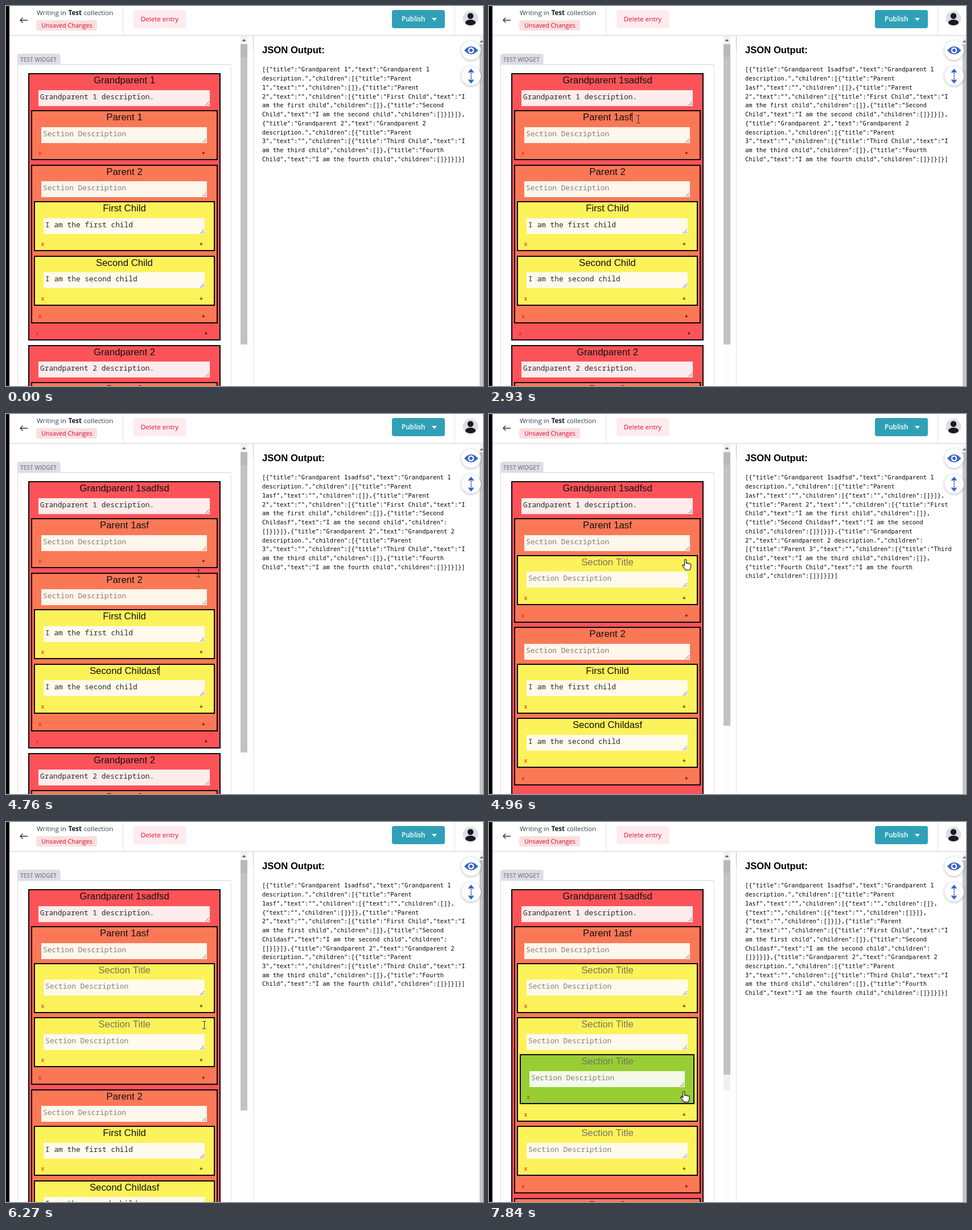
Recreate the animation shown at these times as an HTML page with a canvas. Size 838 px wide and 668 px high, loop 8 s.

```html
<!DOCTYPE html>
<html lang="en">
<head>
<meta charset="utf-8">
<title>Nested section editor</title>
<style>
html, body { margin: 0; width: 100%; height: 100%; overflow: hidden; background: #fff; }
canvas { display: block; }
</style>
</head>
<body>
<canvas id="stage" width="838" height="668"></canvas>
<script>
const ctx = document.getElementById('stage').getContext('2d');
const LOOP = 8000;
const UI = '"Open Sans", sans-serif';
const ARIAL = '"Liberation Sans", Arial, sans-serif';
const TITLE_FONT = '16.8px ' + ARIAL;
const AREA_FONT = '12.83px "Noto Sans Mono", monospace';
const JSON_FONT = '10.4px "DejaVu Sans Mono", monospace';

// Box and text area fill for each nesting depth
const FILLS = ['#fc5359', '#fb7857', '#fcf259', '#97ce33'];
const AREAS = ['#feecec', '#fff6ec', '#fffaeb', '#f4faea'];
const HEAD = 64.8, FOOT = 23.2, GAP = 7.5, MID = 208;

// Section titles being typed: [time, suffix]
const TYPED = {
  top: [[1290, 's'], [1460, 'sad'], [1640, 'sadfs'], [1810, 'sadfsd']],
  parent: [[2600, 'a'], [2730, 'as'], [2860, 'asf']],
  child: [[3780, 'a'], [3900, 'as'], [4230, 'asf']]
};
const FOCUS = [[900, 'top'], [2470, 'parent'], [3650, 'child'], [4800, null]];
const ADDED = [4900, 6000, 6930, 7450];
const CLICKS = [[4780, 4900], [5870, 6000], [6800, 6930], [7250, 7450]];
const THUMB_ENDS = [595, 548, 507, 472, 444];

// Pointer path: [time, x, y, kind]
const PATH = [
  [240, 330, 420, 'arrow'], [900, 307, 134, 'beam'], [2080, 307, 134, 'beam'],
  [2470, 262, 198, 'beam'], [2860, 262, 198, 'beam'], [3120, 285, 258, 'arrow'],
  [3390, 285, 258, 'arrow'], [3650, 286, 452, 'beam'], [4440, 286, 452, 'beam'],
  [4780, 345, 256, 'hand'], [4900, 345, 255, 'beam'], [5100, 345, 255, 'beam'],
  [5400, 347, 353, 'hand'], [5870, 347, 353, 'hand'], [6000, 348, 357, 'beam'],
  [6330, 348, 357, 'beam'], [6550, 347, 447, 'hand'], [6930, 347, 449, 'beam'],
  [7190, 344, 417, 'hand'], [7450, 344, 417, 'hand'], [7780, 342, 481, 'hand']
];

function last(list, t) {
  let found = null;
  for (const item of list) if (item[0] <= t) found = item;
  return found;
}

function rect(x, y, w, h, color, r = 0) {
  ctx.fillStyle = color;
  ctx.beginPath();
  ctx.roundRect(x, y, w, h, r);
  ctx.fill();
}

function disc(x, y, r, color) {
  ctx.fillStyle = color;
  ctx.beginPath();
  ctx.arc(x, y, r, 0, Math.PI * 2);
  ctx.fill();
}

function text(str, x, y, font, color, align = 'left') {
  ctx.font = font;
  ctx.fillStyle = color;
  ctx.textAlign = align;
  ctx.fillText(str, x, y);
}

function poly(points, color) {
  ctx.fillStyle = color;
  ctx.beginPath();
  points.forEach(([x, y]) => ctx.lineTo(x, y));
  ctx.closePath();
  ctx.fill();
}

function stroke(path, color, width = 1) {
  ctx.strokeStyle = color;
  ctx.lineWidth = width;
  ctx.stroke(new Path2D(path));
}

function buildTree(t) {
  const typed = key => (last(TYPED[key], t) || [0, ''])[1];
  const node = (title, body, ...children) => ({ title, text: body, children });
  const blank = () => ({ text: '', children: [] });
  const count = ADDED.filter(a => a <= t).length;
  const extra = Array.from({ length: Math.min(count, 3) }, blank);
  if (count > 3) extra[1].children.push(blank());
  return [
    node('Grandparent 1' + typed('top'), 'Grandparent 1 description.',
      node('Parent 1' + typed('parent'), '', ...extra),
      node('Parent 2', '',
        node('First Child', 'I am the first child'),
        node('Second Child' + typed('child'), 'I am the second child'))),
    node('Grandparent 2', 'Grandparent 2 description.',
      node('Parent 3', '',
        node('Third Child', 'I am the third child'),
        node('Fourth Child', 'I am the fourth child')))
  ];
}

function heightOf(node) {
  return node.children.reduce((sum, c) => sum + heightOf(c) + GAP, HEAD + FOOT);
}

function drawArea(node, depth, y) {
  const left = Math.round(57 + 4.5 * depth);
  const right = Math.round(357.9 - 4.5 * depth);
  const top = Math.round(y + 29.6);
  rect(left, top, right - left, 28, AREAS[depth]);
  text(node.text || 'Section Description', left + 3, top + 16, AREA_FONT,
    node.text ? '#2b2b2b' : '#857f78');
  stroke(`M${right - 8} ${top + 27}l7 -7M${right - 4} ${top + 27}l3 -3`, '#666');
}

function drawNode(node, depth, y) {
  const height = heightOf(node);
  const left = 39 + 5 * depth, right = Math.round(377 - 5.2 * depth);
  const top = Math.round(y), bottom = Math.round(y + height);
  rect(left, top, right - left, bottom - top, '#0c0808');
  rect(left + 2, top + 2, right - left - 4, bottom - top - 4, FILLS[depth]);
  text(node.title || 'Section Title', MID, top + 18, TITLE_FONT,
    node.title ? '#111' : '#78755f', 'center');
  drawArea(node, depth, y);
  let childY = y + HEAD;
  for (const child of node.children) {
    drawNode(child, depth + 1, childY);
    childY += heightOf(child) + GAP;
  }
  const font = '10.67px ' + ARIAL;
  text('x', 55 + 4.7 * depth, bottom - 9, font, depth ? '#e8121c' : '#d8222e', 'center');
  text('+', 351 - 4.1 * depth, bottom - 9, font, '#000', 'center');
}

function drawCaret(tree, t) {
  const focus = last(FOCUS, t);
  if (!focus || !focus[1]) return;
  const parents = tree[0].children;
  const spot = {
    top: [tree[0].title, 122],
    parent: [parents[0].title, 187],
    child: [parents[1].children[1].title, 442]
  }[focus[1]];
  ctx.font = TITLE_FONT;
  rect(Math.round(MID + ctx.measureText(spot[0]).width / 2), spot[1], 1, 17, '#111');
}

function drawJson(tree) {
  const parts = JSON.stringify(tree).split(/(?<= )|(?<=[,:])(?=[\[{])/);
  const lines = [''];
  for (const part of parts) {
    const line = lines[lines.length - 1];
    if ((line + part).trimEnd().length > 59) lines.push(part);
    else lines[lines.length - 1] += part;
  }
  lines.forEach((line, i) => text(line, 450, Math.round(115.4 + 15.73 * i), JSON_FONT, '#080808'));
}

function drawHeader() {
  rect(6, 51, 832, 1, '#dcdde0');
  rect(6, 52, 832, 1, '#eeeff1');
  rect(205, 0, 1, 52, '#dfe0e4');
  rect(788, 0, 1, 52, '#dfe0e4');
  stroke('M25 25H38M29.5 20.5L25 25L29.5 29.5', '#2b2f38', 1.3);

  const ink = '#313a48';
  text('Writing in ', 54, 16, '11.6px ' + UI, ink);
  text('Test', 109.5, 16, 'bold 11.6px ' + UI, '#1b222c');
  text('collection', 136.5, 16, '11.6px ' + UI, ink);
  rect(53, 25, 107, 18, '#fbdfdf', 4);
  text('Unsaved Changes', 62, 38, '10.8px ' + UI, '#d9062f');

  rect(224, 7, 92.5, 32, '#fdebed', 4);
  text('Delete entry', 270, 27, '11.6px ' + UI, '#dd0c3b', 'center');
  rect(678, 7, 93, 32, '#30a0b7', 4);
  text('Publish', 695, 27, '600 11.7px ' + UI, '#fff');
  poly([[748, 21], [757, 21], [752.5, 26]], '#fff');

  disc(816, 22, 13.5, '#dedfe4');
  disc(816, 17.5, 5.2, '#171a22');
  ctx.beginPath();
  ctx.ellipse(816, 29, 9, 5, 0, 0, Math.PI * 2);
  ctx.fill();
}

function drawRoundButton(y) {
  ctx.save();
  ctx.shadowColor = 'rgba(60,65,80,.4)';
  ctx.shadowBlur = 4;
  ctx.shadowOffsetY = 1;
  disc(817, y, 17, '#fff');
  ctx.restore();
}

function drawPreview(tree) {
  rect(434, 52, 1, 616, '#dfe1e5');
  rect(434, 53, 1, 24, '#bfc1c6');
  rect(832, 53, 6, 14, '#f1f1f1');
  rect(832, 67, 6, 601, '#c5c5c5');
  poly([[832, 64], [838, 64], [836, 60]], '#606060');
  text('JSON Output:', 450, 83, 'bold 16.64px ' + ARIAL, '#000');
  drawJson(tree);

  const blue = '#3b66c4';
  drawRoundButton(78);
  ctx.fillStyle = blue;
  ctx.fill(new Path2D('M805 78Q817 64 829.5 78Q817 92 805 78Z'));
  disc(817, 78, 5.2, '#fff');
  disc(817, 78, 3, blue);
  drawRoundButton(123);
  poly([[811.5, 117], [817, 110], [822.5, 117]], blue);
  poly([[811.5, 129.5], [817, 136.5], [822.5, 129.5]], blue);
  for (const y of [118, 122, 126]) rect(816, y, 2.2, 2.4, blue);
}

function drawEditor(tree, t) {
  rect(20, 84, 75.5, 20, '#dddee3', 3);
  text('TEST WIDGET', 25, 98, '600 10.1px ' + UI, '#7b8290');
  rect(20, 102, 376, 600, '#dddee3', 3);
  rect(21, 103.5, 374, 600, '#fff', 2);

  const count = ADDED.filter(a => a <= t).length;
  const end = THUMB_ENDS[count];
  rect(412, 53, 12, 615, '#fdfdfd');
  rect(412, 53, 12, 14, '#f1f1f1');
  if (count === 4) rect(412, end, 12, THUMB_ENDS[3] - end, '#f0f0f0');
  rect(412, 67, 12, end - 67, '#c2c2c2');
  rect(412, 67, 12, 23, '#b9b9b9');
  poly([[414.5, 62], [421.5, 62], [418, 58]], '#606060');

  let y = 118.2;
  for (const node of tree) {
    drawNode(node, 0, y);
    y += heightOf(node) + GAP;
  }
  drawCaret(tree, t);
}

function drawHand(x, y) {
  ctx.save();
  ctx.translate(x, y);
  const hand = new Path2D('M-1.5 1Q0 -1 1.5 1V7Q3 5.5 4.2 7.2Q5.6 6.2 6.8 8Q8.4 7 9.6 9V14' +
    'L8 18.5H0.5L-5 11.5Q-5.5 9 -3.3 9.6L-1.5 11Z');
  ctx.fillStyle = '#fff';
  ctx.fill(hand);
  ctx.strokeStyle = '#111';
  ctx.lineWidth = 1.1;
  ctx.stroke(hand);
  ctx.restore();
}

function drawPointer(t) {
  const now = Math.floor(t / 130.7) * 130.7;
  const from = last(PATH, now);
  if (!from) return;
  const to = PATH[PATH.indexOf(from) + 1] || from;
  const p = to === from ? 0 : (now - from[0]) / (to[0] - from[0]);
  const ease = p * p * (3 - 2 * p);
  const x = from[1] + (to[1] - from[1]) * ease;
  const y = from[2] + (to[2] - from[2]) * ease;

  if (CLICKS.some(([a, b]) => t >= a && t < b)) disc(x, y + 1, 10.5, 'rgba(255,245,0,.75)');
  if (from[3] === 'hand') drawHand(x, y);
  else if (from[3] === 'beam') {
    const px = Math.round(x), py = Math.round(y);
    stroke(`M${px - 3} ${py - 6.5}h2.5l.5 .5l.5 -.5h2.5M${px + .5} ${py - 6}v12` +
      `M${px - 3} ${py + 6.5}h2.5l.5 -.5l.5 .5h2.5`, py < 150 ? 'rgba(90,70,75,.55)' : '#2c3038');
  } else {
    ctx.save();
    ctx.translate(x, y);
    const arrow = new Path2D('M0 0V15L3.5 12L6 17.5L8.3 16.5L6 11H10.5Z');
    ctx.fillStyle = '#fff';
    ctx.fill(arrow);
    ctx.strokeStyle = '#111';
    ctx.lineWidth = 1;
    ctx.stroke(arrow);
    ctx.restore();
  }
}

function draw(t) {
  rect(0, 0, 838, 668, '#fff');
  rect(0, 0, 6, 668, '#000');
  const tree = buildTree(t);
  drawEditor(tree, t);
  drawHeader();
  drawPreview(tree);
  drawPointer(t);
}

const start = performance.now();
function tick() {
  draw((performance.now() - start) % LOOP);
  requestAnimationFrame(tick);
}
tick();
</script>
</body>
</html>
```
